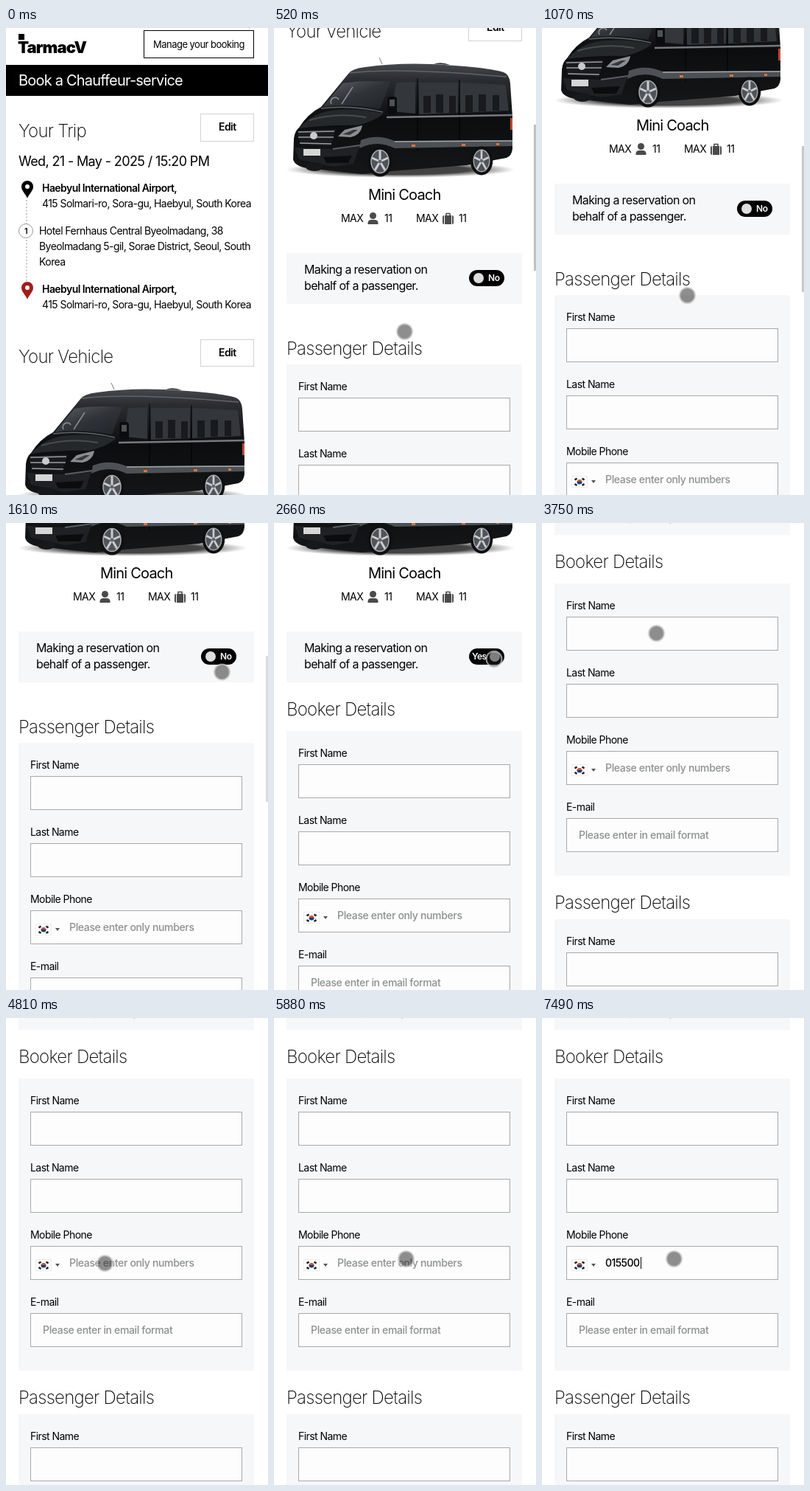
An HTML page that plays this animation: 356 by 633 pixels, repeating every 8 s.

```html
<!DOCTYPE html>
<html lang="en">
<head>
<meta charset="utf-8">
<title>Booking form</title>
<style>
html, body { margin: 0; height: 100%; overflow: hidden; background: #fff; }
svg { display: block; width: 100%; height: 100%; }
text { font: 400 14px Inter, sans-serif; letter-spacing: -.04em; white-space: pre; }
.logo { font-size: 22px; font-weight: 900; }
.title { font-size: 24px; font-weight: 200; letter-spacing: -.03em; }
.big { font-size: 20px; }
.date { font-size: 18px; letter-spacing: -.035em; }
.mid { font-size: 16px; }
.small { font-size: 13px; }
.bold { font-weight: 600; }
.stop { font-size: 11px; font-weight: 600; text-anchor: middle; }
.switch { font-size: 12px; font-weight: 600; fill: #fff; }
.hint { font-weight: 500; fill: #8d9090; letter-spacing: -.025em; }
.typed { font-weight: 500; }
.panel { fill: #f6f7f9; }
.field { fill: #fdfdfd; stroke: #a9a9a9; }
.edit { fill: #fff; stroke: #d2d2d2; }

.page, .pointer, .bar, .off, .on, .caret1, .caret2, .ghost, .t1, .t2, .t3 {
  animation: 8s step-end infinite;
}
.page { animation-name: scroll; }
.pointer { animation-name: point; }
.bar { animation-name: bar; }
.off { animation-name: off; }
.on { animation-name: on; }
.caret1 { animation-name: caret1; }
.caret2 { animation-name: caret2; }
.ghost { animation-name: ghost; }
.t1 { animation-name: t1; }
.t2 { animation-name: t2; }
.t3 { animation-name: t3; }

@keyframes scroll {
  0% { transform: none; }
  6.5% { transform: translateY(-441px); }
  13.375% { transform: translateY(-535px); }
  20.125% { transform: translateY(-599px); }
  40.25%, 100% { transform: translateY(-799px); }
}
@keyframes point {
  0% { transform: translate(-50px, 0); }
  6.5% { transform: translate(177.5px, 411.5px); }
  13.375% { transform: translate(197.5px, 362.5px); }
  20.125% { transform: translate(293.5px, 202px); }
  26.625% { transform: translate(299px, 184.5px); }
  40.25% { transform: translate(180.5px, 310.5px); }
  46.875% { transform: translate(155.5px, 149.5px); }
  60.125% { transform: translate(134.5px, 332.5px); }
  66.875% { transform: translate(134px, 336.5px); }
  73.5%, 100% { transform: translate(179.5px, 326.5px); }
}
@keyframes bar {
  0% { visibility: hidden; }
  6.5% { visibility: visible; transform: translateY(131px); fill: #c1c1c1; }
  13.375% { visibility: visible; transform: translateY(160px); fill: #c8c8c8; }
  20.125% { visibility: visible; transform: translateY(180px); fill: #dadada; }
  26.625% { visibility: hidden; }
  40.25% { visibility: visible; transform: translateY(199px) scaleY(.823); fill: #c1c1c1; }
  46.875%, 100% { visibility: hidden; }
}
@keyframes off { 0% { visibility: visible; } 33.25%, 100% { visibility: hidden; } }
@keyframes on { 0% { visibility: hidden; } 33.25%, 100% { visibility: visible; } }
@keyframes caret1 { 0% { visibility: hidden; } 53.5% { visibility: visible; } 60.125%, 100% { visibility: hidden; } }
@keyframes caret2 {
  0% { visibility: hidden; }
  66.875% { visibility: visible; transform: translateX(86px); }
  73.5% { visibility: hidden; }
  80.125% { visibility: visible; transform: translateX(94px); }
  86.75% { visibility: visible; transform: translateX(109px); }
  93.625%, 100% { visibility: visible; transform: translateX(134px); }
}
@keyframes ghost { 0% { visibility: hidden; } 33.25% { visibility: visible; } 80.125%, 100% { visibility: hidden; } }
@keyframes t1 { 0% { visibility: hidden; } 80.125% { visibility: visible; } 86.75%, 100% { visibility: hidden; } }
@keyframes t2 { 0% { visibility: hidden; } 86.75% { visibility: visible; } 93.625%, 100% { visibility: hidden; } }
@keyframes t3 { 0% { visibility: hidden; } 93.625%, 100% { visibility: visible; } }
</style>
</head>
<body>
<svg viewBox="0 0 356 633">
  <defs>
    <linearGradient id="paint" x2="0" y2="1">
      <stop offset="0" stop-color="#45484c"/>
      <stop offset=".14" stop-color="#2b2d31"/>
      <stop offset=".5" stop-color="#0c0d0f"/>
      <stop offset="1" stop-color="#151618"/>
    </linearGradient>
    <linearGradient id="glass" x2="1" y2="1">
      <stop offset="0" stop-color="#5d6166"/>
      <stop offset=".5" stop-color="#303338"/>
      <stop offset="1" stop-color="#202327"/>
    </linearGradient>
    <radialGradient id="shade">
      <stop offset=".6" stop-color="#222" stop-opacity=".85"/>
      <stop offset="1" stop-color="#555" stop-opacity="0"/>
    </radialGradient>
    <path id="pin" fill-rule="evenodd" d="M0 24C-2 18-8 14-8 8A8 8 0 0 1 8 8C8 14 2 18 0 24ZM0 5A3 3 0 0 0 0 11A3 3 0 0 0 0 5Z"/>
    <g id="wheel">
      <ellipse rx="17" ry="20.5" fill="#0f1011"/>
      <ellipse rx="12" ry="15.5" fill="#505357"/>
      <path d="M0 0V-15M0 0L11-5M0 0L7 12M0 0L-7 12M0 0L-11-5" stroke="#c9ccd0" stroke-width="3"/>
      <ellipse rx="12" ry="15.5" fill="none" stroke="#a9acb0" stroke-width="1.5"/>
      <circle r="2.5" fill="#666"/>
    </g>
    <g id="fields">
      <rect class="panel" x="17" width="320" height="396"/>
      <text x="33" y="35">First Name</text>
      <text x="33" y="126">Last Name</text>
      <text x="33" y="217">Mobile Phone</text>
      <text x="33" y="308">E-mail</text>
      <g class="field">
        <rect id="box" x="33.5" y="45.5" width="287" height="45"/>
        <use href="#box" y="91"/>
        <use href="#box" y="182"/>
        <use href="#box" y="273"/>
      </g>
      <rect x="40.5" y="245.500" width="21" height="15" fill="#fff" stroke="#ececec"/>
      <path d="M44.500 250.500l3-2M44.500 256l3 2M54.500 248.500l3 2M54.500 258l3-2" stroke="#222" stroke-width="2.600"/>
      <path d="M47.500 253.500a3.500 3.500 0 0 1 7 0z" fill="#c8502c"/>
      <path d="M47.500 253a3.500 3.500 0 0 0 7 0z" fill="#183c78"/>
      <path d="M67 251h6l-3 4z" fill="#555"/>
      <text class="hint" x="50" y="346">Please enter in email format</text>
    </g>
  </defs>

  <rect width="356" height="633" fill="#fff"/>
  <g class="page">
    <rect x="17" y="8" width="8" height="8"/>
    <text class="logo" x="16" y="34">TarmacV</text>
    <rect x="187.5" y="3.5" width="149" height="37" fill="#fff" stroke="#000"/>
    <text class="small" x="200" y="27">Manage your booking</text>
    <rect y="50" width="356" height="42"/>
    <text class="big" x="17" y="78" fill="#fff">Book a Chauffeur-service</text>

    <text class="title" x="17" y="148">Your Trip</text>
    <rect class="edit" x="264.5" y="116.5" width="72" height="37"/>
    <text class="bold" x="289" y="139">Edit</text>
    <text class="date" x="17" y="187">Wed, 21 - May - 2025 / 15:20 PM</text>

    <path d="M28 233V346" stroke="#b8b8b8" stroke-width="1.5" stroke-dasharray="2 2.5"/>
    <use href="#pin" x="29" y="207"/>
    <text class="bold" x="49" y="222">Haebyul International Airport,</text>
    <text x="49" y="243">415 Solmari-ro, Sora-gu, Haebyul, South Korea</text>
    <circle cx="27" cy="275" r="9.5" fill="#fff" stroke="#9a9a9a"/>
    <text class="stop" x="27" y="279">1</text>
    <text x="45" y="280">Hotel Fernhaus Central Byeolmadang, 38</text>
    <text x="45" y="301">Byeolmadang 5-gil, Sorae District, Seoul, South</text>
    <text x="45" y="322">Korea</text>
    <use href="#pin" x="29" y="344" fill="#a01d1a"/>
    <text class="bold" x="49" y="359">Haebyul International Airport,</text>
    <text x="49" y="380">415 Solmari-ro, Sora-gu, Haebyul, South Korea</text>

    <text class="title" x="17" y="454">Your Vehicle</text>
    <rect class="edit" x="264.5" y="422.5" width="72" height="36"/>
    <text class="bold" x="289" y="445">Edit</text>

    <g transform="translate(0 441)">
      <ellipse cx="172" cy="192" rx="156" ry="11" fill="url(#shade)"/>
      <path d="M147 49L143 40" stroke="#777"/>
      <path d="M217 49q10-4 22 1z" fill="#333"/>
      <path d="M26 178L27 150Q28 140 34 135Q46 116 64 107L101 62Q106 55 124 53Q165 47 215 49Q290 53 312 60Q320 63 321 75L324 120V164Q323 173 316 176L262 186L160 194L120 198L45 190Q28 187 26 178Z" fill="url(#paint)"/>
      <path d="M103 61Q165 53 316 66" fill="none" stroke="#606368" stroke-width="1.500"/>
      <path d="M66 107L93 75Q118 70 158 73L144 110Q100 102 66 107Z" fill="url(#glass)"/>
      <path d="M78 103a5 5 0 0 1 10-6M92 103L107 80" fill="none" stroke="#8b8f94" stroke-width="1.500"/>
      <path d="M166 74L192 73V116L160 113ZM197 74H250V115L197 117ZM253 74L315 77L319 112L253 115Z" fill="#33363a"/>
      <path d="M203 92h10v23h-10zM220 90h10v25h-10zM238 92h9v23h-9zM260 91h10v23h-10zM278 90h10v23h-10zM297 91h9v21h-9z" fill="#181a1d"/>
      <path d="M195 68V167M252 70V163" stroke="#000"/>
      <path d="M34 136Q55 112 88 111Q120 109 149 116Q135 127 113 132Q75 131 34 136Z" fill="#25282b"/>
      <path d="M64 109Q105 104 148 114" fill="none" stroke="#62656a" stroke-width="1.500"/>
      <path d="M48 125Q85 114 125 121" fill="none" stroke="#484b4f" stroke-width="2"/>
      <path d="M153 121L324 118" stroke="#777a7e" stroke-width="2.500"/>
      <path d="M118 152Q140 143 164 153L324 152V160L270 161L164 163Q140 151 116 163Z" fill="#4d5054"/>
      <path d="M164 154L324 153" stroke="#a3a6a9" stroke-width="1.500"/>
      <rect x="154" y="93" width="13" height="24" rx="4" fill="#0b0c0d"/>
      <path d="M157 97h7v9h-7z" fill="#4e5257"/>
      <path d="M31 139L84 137L77 160L36 158Z" fill="#191b1e"/>
      <path d="M33 141L82 140M33 148L81 148M35 156L78 157" stroke="#9a9da1" stroke-width="1.500"/>
      <circle cx="54" cy="146" r="5" fill="#c9cbce"/>
      <path d="M87 147L96 138L120 132Q118 145 104 148Z" fill="#8a8e92"/>
      <path d="M93 144L108 138L114 138L103 145Z" fill="#35383c"/>
      <path d="M28 162L80 164L116 161L108 184L80 188L34 178Z" fill="#1f2124"/>
      <path d="M80 164L117 159" stroke="#5a5d61" stroke-width="2"/>
      <rect x="40" y="164" width="23" height="9" fill="#d5d6d5"/>
      <path d="M67 175L106 173L101 183L71 183Z" fill="#0b0c0d"/>
      <path d="M321 122h3v16h-3z" fill="#bd4930"/>
      <path d="M187 158h5v3h-5zM255 157h5v3h-5zM302 156h4v3h-4z" fill="#d7773c"/>
      <use href="#wheel" x="144" y="181"/>
      <use href="#wheel" transform="translate(282 180) scale(.9 .95)"/>
      <ellipse cx="55" cy="188" rx="12" ry="6" fill="#17181a"/>
    </g>

    <text class="big" x="128" y="674">Mini Coach</text>
    <text x="91" y="704">MAX</text>
    <g fill="#4a4a4a">
      <circle cx="134.5" cy="695.5" r="4.5"/>
      <path d="M127.5 707V705Q128 701 132 701H137Q141 701 141.500 705V707Z"/>
      <path d="M231 695v12q-2 0-2-2v-8q0-2 2-2zM232 695h9v12h-9zM242 695q2 0 2 2v8q0 2-2 2z"/>
    </g>
    <path d="M234 695v-2.500h5v2.500" fill="none" stroke="#4a4a4a" stroke-width="1.5"/>
    <text x="150" y="704">11</text>
    <text x="193" y="704">MAX</text>
    <text x="251" y="704">11</text>

    <rect class="panel" x="17" y="746" width="320" height="69"/>
    <text class="mid" x="41" y="774">Making a reservation on</text>
    <text class="mid" x="41" y="796">behalf of a passenger.</text>
    <rect x="265" y="769" width="48" height="22" rx="11"/>
    <g class="off">
      <circle cx="278" cy="780" r="7" fill="#ddd"/>
      <text class="switch" x="291" y="784">No</text>
      <text class="title" x="17" y="884">Passenger Details</text>
      <use href="#fields" y="897"/>
      <text class="hint" x="86" y="1152">Please enter only numbers</text>
    </g>
    <g class="on">
      <circle cx="300" cy="780" r="7" fill="#ddd"/>
      <text class="switch" x="269" y="784">Yes</text>
      <text class="title" x="17" y="860">Booker Details</text>
      <use href="#fields" y="881"/>
      <text class="title" x="17" y="1322">Passenger Details</text>
      <use href="#fields" y="1336"/>
    </g>
    <text class="hint ghost" x="86" y="1136">Please enter only numbers</text>
    <text class="typed t1" x="86" y="1136">0</text>
    <text class="typed t2" x="86" y="1136">015</text>
    <text class="typed t3" x="86" y="1136">015500</text>
    <rect class="caret1" x="50" y="941" width="1" height="16"/>
    <rect class="caret2" y="1123" width="1" height="16"/>
  </g>

  <rect class="bar" x="353" width="3" height="198"/>
  <g class="pointer">
    <circle r="10.5" fill="#1e1e1e" fill-opacity=".5"/>
    <circle r="10.5" fill="none" stroke="#ccc" stroke-opacity=".75" stroke-width="2"/>
  </g>
</svg>
</body>
</html>
```
